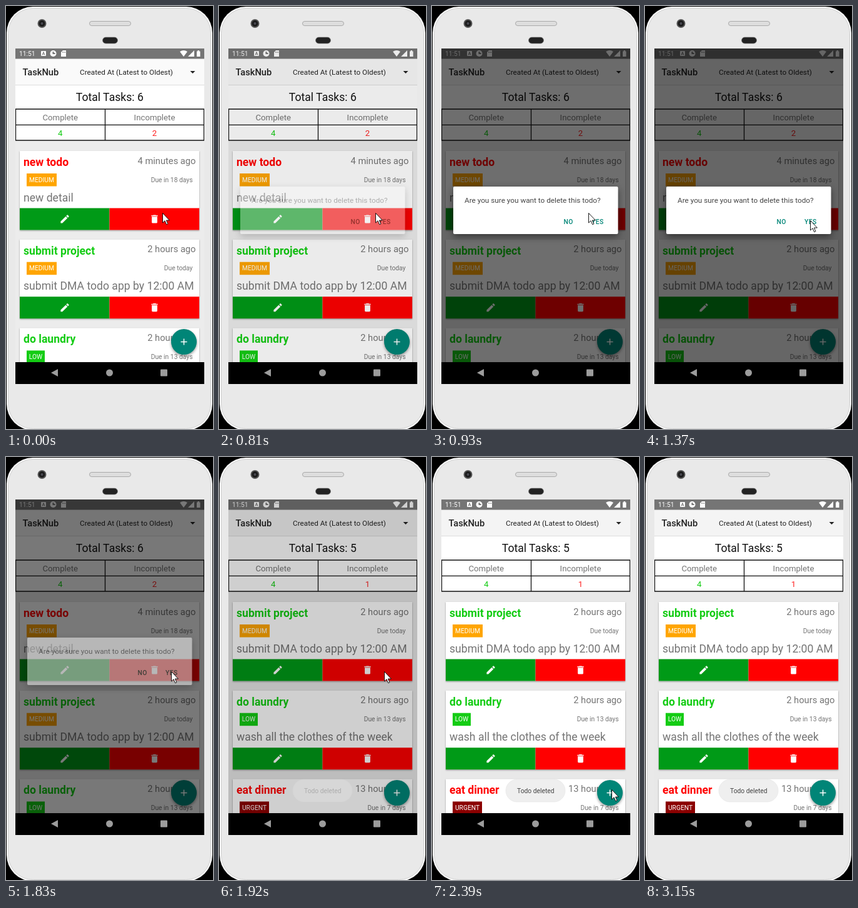
These frames come from a looping animation (331 by 677 pixels, 3.46 s). An HTML page:

```html
<!DOCTYPE html>
<html lang="en">
<head>
<meta charset="utf-8">
<title>Todo list</title>
<style>
  html, body { margin: 0; width: 100%; height: 100%; overflow: hidden; background: #000; }
  svg { display: block; width: 331px; height: 677px; font-family: Roboto, sans-serif; }
  .end { text-anchor: end; }
  .mid { text-anchor: middle; }
  .bold { font-weight: 700; }
  .medium { font-weight: 500; }
  .s24 { font-size: 17.6px; }
  .s20 { font-size: 14.7px; }
  .s18 { font-size: 13.2px; }
  .s16 { font-size: 11.75px; }
  .s14 { font-size: 10.3px; }
  .grey { fill: #757575; }
  .card { filter: drop-shadow(0 1px 1px #0006); }
  .fab { filter: drop-shadow(0 2px 2px #0006); }
  .dialog-box { filter: drop-shadow(0 4px 6px #0007); }

  .before, .after, .dim, .dialog, .toast { animation: 3460ms step-end infinite; }
  .before { animation-name: before; }
  .after { animation-name: after; }
  .dim { animation-name: dim; }
  .dialog { animation-name: dialog; }
  .toast { animation-name: toast; }
  .cursor { animation: cursor 3460ms linear infinite; }

  @keyframes before { 0% { visibility: visible } 54.3%, 100% { visibility: hidden } }
  @keyframes after { 0% { visibility: hidden } 54.3%, 100% { visibility: visible } }
  @keyframes dim {
    0% { opacity: 0 }
    23.4% { opacity: .08 } 25.1% { opacity: .34 } 26.85% { opacity: .57 } 28.6% { opacity: .6 }
    52.85% { opacity: .53 } 54.3% { opacity: .36 } 55.45% { opacity: .19 }
    57.2% { opacity: .08 } 58.9% { opacity: .02 } 60.6%, 100% { opacity: 0 }
  }
  @keyframes dialog {
    0% { opacity: 0 }
    23.4% { opacity: .37 } 25.1% { opacity: .85 } 26.85% { opacity: 1 }
    52.85% { opacity: .47 } 54.3% { opacity: .12 } 55.45%, 100% { opacity: 0 }
  }
  @keyframes toast {
    0% { opacity: 0 }
    55.45% { opacity: .25 } 57.2% { opacity: .5 } 58.9% { opacity: .75 }
    60.6% { opacity: .93 } 62.4%, 100% { opacity: 1 }
  }
  @keyframes cursor {
    0%, 28.9% { transform: translate(250px, 331px) }
    37.8% { transform: translate(256px, 343px) }
    39.5%, 57.8% { transform: translate(264px, 343px) }
    62.4% { transform: translate(266px, 380px) }
    66.7% { transform: translate(278px, 468px) }
    69%, 69.6% { transform: translate(287px, 532px) }
    72.5% { transform: translate(291px, 578px) }
    76% { transform: translate(294px, 614px) }
    83.2% { transform: translate(298px, 646px) }
    91%, 100% { transform: translate(299px, 680px) }
  }
</style>
</head>
<body>
<svg viewBox="0 0 331 677">
  <defs>
    <path id="edit" transform="scale(.735) translate(-12 -12)" fill="#fff" d="M3 17.25V21h3.75L17.81 9.94l-3.75-3.75zM20.71 7.04a1 1 0 0 0 0-1.41l-2.34-2.34a1 1 0 0 0-1.41 0l-1.83 1.83 3.75 3.75z"/>
    <path id="trash" transform="scale(.735) translate(-12 -12)" fill="#fff" d="M6 19a2 2 0 0 0 2 2h8a2 2 0 0 0 2-2V7H6zM19 4h-3.5l-1-1h-5l-1 1H5v2h14z"/>
    <clipPath id="content"><rect x="15" y="68" width="302" height="502"/></clipPath>
  </defs>

  <!-- phone -->
  <rect width="331" height="677"/>
  <rect x="1" y="1" width="329" height="678" rx="42" fill="#fafafa"/>
  <rect x="3.5" y="3.5" width="324" height="673" rx="40" fill="#e9e9e9" stroke="#d2d2d2"/>
  <circle cx="57.500" cy="28" r="7" fill="#555"/>
  <circle cx="57.500" cy="28" r="5" fill="#1b1b1b"/>
  <circle cx="57.500" cy="28" r="2" fill="#4a4a52"/>
  <rect x="133.500" y="24.500" width="66" height="7" rx="3.500" fill="#dedede" stroke="#aaa"/>
  <rect x="154.500" y="50" width="24" height="10" rx="5" fill="#222" stroke="#777" stroke-width=".7"/>

  <g clip-path="url(#content)">
    <g id="lists"></g>

    <!-- add button -->
    <circle class="fab" cx="284.500" cy="537.500" r="20.500" fill="#008577"/>
    <path d="M279.500 537.500h10M284.500 532.500v10" stroke="#fff" stroke-width="1.500"/>

    <!-- status bar -->
    <rect x="15" y="68" width="302" height="16.500" fill="#757575"/>
    <g fill="#fff">
      <text class="s14" x="21" y="80">11:51</text>
      <rect x="56" y="72" width="8" height="8" rx="1"/>
      <circle cx="75.500" cy="76" r="5"/>
      <path d="M91 71h5v10h-8v-7z"/>
      <path d="M278 73q6-4 12 0l-6 8zM301 71v10h-10zM305 72.500h1.500v-1.500h2.500v1.500h1.500v8.500h-5.500z"/>
    </g>
    <path d="M58 78.500l2-5 2 5M59 77h2" fill="none" stroke="#757575"/>
    <path d="M75.500 73v3h3" fill="none" stroke="#757575" stroke-width="2"/>
    <path d="M90.500 73v2M92.500 73v2M94.500 73v2" stroke="#757575" stroke-width=".8"/>

    <rect class="dim" x="15" y="68" width="302" height="502"/>

    <g class="dialog">
      <rect class="dialog-box" x="34" y="289" width="263.500" height="76" rx="2" fill="#fff"/>
      <text class="s16" x="52" y="315" fill="#444">Are you sure you want to delete this todo?</text>
      <g class="s14 medium" fill="#008577" letter-spacing=".5">
        <text x="210.500" y="348.700">NO</text>
        <text x="255" y="348.700">YES</text>
      </g>
    </g>

    <g class="toast">
      <rect x="118" y="516" width="95" height="36" rx="18" fill="#efefef" stroke="#e4e4e4" stroke-width=".6"/>
      <text class="s14 mid" x="165.800" y="537.700" fill="#444">Todo deleted</text>
    </g>
  </g>

  <!-- navigation bar -->
  <rect x="15" y="570" width="302" height="35"/>
  <g fill="#9c9c9c">
    <path d="M72 587l11-6v12z"/>
    <circle cx="165.500" cy="587" r="5.500"/>
    <rect x="247" y="581.500" width="11" height="11" rx="1"/>
  </g>

  <path class="cursor" d="M.5.5v15.500l3.500-3.300 2.600 6 2.300-1-2.500-5.700h5z" fill="#fff" stroke="#000" stroke-width=".9"/>
</svg>

<script>
  const GREEN = '#14cc14', RED = '#f00';
  const MEDIUM = { label: 'MEDIUM', width: 48, color: '#ffa500' };
  const LOW = { label: 'LOW', width: 29, color: '#14cc14' };
  const URGENT = { label: 'URGENT', width: 47, color: '#8b0000' };

  const todo = (title, color, level, age, due, detail) => ({ title, color, level, age, due, detail });
  const fresh = todo('new todo', RED, MEDIUM, '4 minutes ago', 'Due in 18 days', 'new detail');
  const project = todo('submit project', GREEN, MEDIUM, '2 hours ago', 'Due today', 'submit DMA todo app by 12:00 AM');
  const laundry = todo('do laundry', GREEN, LOW, '2 hours ago', 'Due in 13 days', 'wash all the clothes of the week');
  const dinner = todo('eat dinner', RED, URGENT, '13 hours ago', 'Due in 7 days', '');

  const card = ({ title, color, level, age, due, detail }, i) => `
    <g transform="translate(0 ${232 + i * 141.7})">
      <rect class="card" x="22" width="287" height="126.500" fill="#fff"/>
      <text class="s24 bold" x="28" y="24" fill="${color}">${title}</text>
      <text class="s20 grey end" x="303.500" y="20.800">${age}</text>
      <rect x="33" y="36" width="${level.width}" height="20.500" fill="${level.color}"/>
      <text class="s14 mid" x="${33 + level.width / 2}" y="49.700" fill="#fff">${level.label}</text>
      <text class="s14 grey end" x="298.500" y="49.500">${due}</text>
      <text class="s24 grey" x="28" y="80.500">${detail}</text>
      <rect x="22" y="91.500" width="143.500" height="35" fill="#009a17"/>
      <rect x="165.500" y="91.500" width="143.500" height="35" fill="#f00"/>
      <use href="#edit" x="94" y="109"/>
      <use href="#trash" x="237.500" y="109"/>
    </g>`;

  const page = (name, todos, total, open, bar, back) => `
    <g class="${name}">
      <rect x="15" y="68" width="302" height="502" fill="${back}"/>
      <rect x="15" y="84" width="302" height="43" fill="${bar}"/>
      <path d="M15 126.500h302" stroke="#ddd"/>
      <text class="s20 medium" x="26.500" y="111" fill="#222">TaskNub</text>
      <text class="s16" x="118" y="110.200" fill="#222">Created At (Latest to Oldest)</text>
      <path d="M294.500 104h8l-4 4z" fill="#222"/>
      <rect x="15" y="127" width="302" height="88" fill="#fff"/>
      <text class="s24 mid" x="165.800" y="152.300" fill="#111">Total Tasks: ${total}</text>
      <path d="M15 165h302M15 190.300h302M15 215h302M15.500 165v50M158.500 165v50M316.500 165v50" stroke="#111" stroke-width="1.300"/>
      <g class="s18 mid">
        <text class="grey" x="86.800" y="182.500">Complete</text>
        <text class="grey" x="237.500" y="182.500">Incomplete</text>
        <text x="86.800" y="207.800" fill="${GREEN}">4</text>
        <text x="237.500" y="207.800" fill="#ff2020">${open}</text>
      </g>
      ${todos.map(card).join('')}
    </g>`;

  document.getElementById('lists').innerHTML =
    page('before', [fresh, project, laundry], 6, 2, '#fafafa', '#ececec') +
    page('after', [project, laundry, dinner], 5, 1, '#f4f4f4', '#e8e8e8');
</script>
</body>
</html>
```
